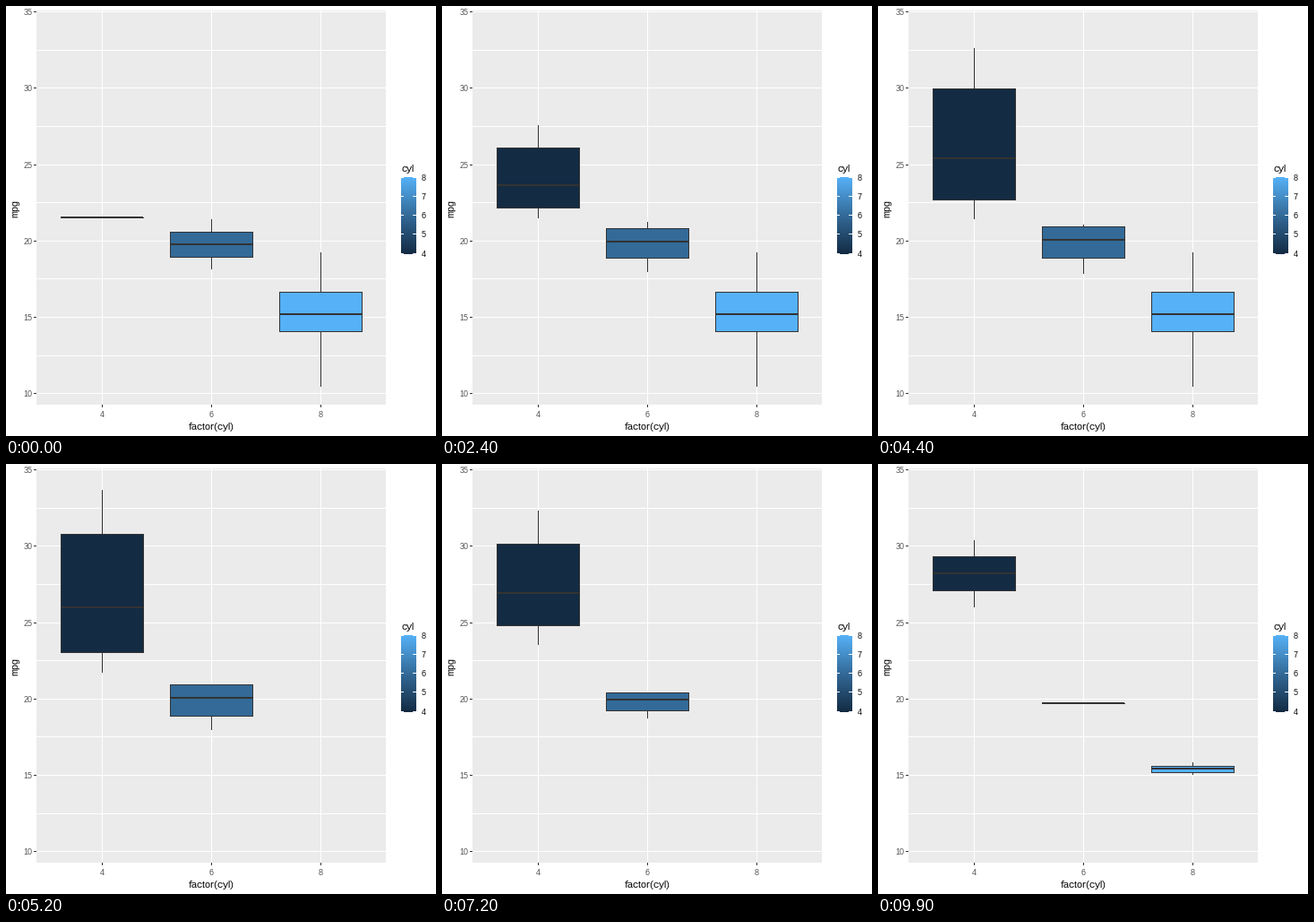
Recreate the animation shown at these times as a matplotlib script. Size 480 by 480 pixels, loop 10 s.

```python
import math

import matplotlib.pyplot as plt
import numpy as np
from matplotlib.animation import FuncAnimation
from matplotlib.colors import LinearSegmentedColormap
from matplotlib.patches import Rectangle

SIZE, DPI = 480, 72
FRAMES, INTERVAL = 100, 100
MID = 49                      # frame at which the second state is reached
INK = "#333333"

plt.rcParams.update({
    "font.family": "Liberation Sans",
    "text.hinting": "native",
    "text.hinting_factor": 1,
})

# Panel geometry in pixels
LEFT, TOP, RIGHT, BOTTOM = 34, 5, 424, 445
UNIT_X, UNIT_Y = 121.9, 17.0365
HALF = 0.375 * UNIT_X

# Five-number summaries for each cylinder count, one per state
STATS = {
    4: [(21.5,) * 5,
        (21.4, 22.8, 25.85, 30.9, 33.9),
        (26.0, 27.1, 28.2, 29.3, 30.4)],
    6: [(18.1, 18.925, 19.75, 20.575, 21.4),
        (17.8, 18.85, 20.1, 21.0, 21.0),
        (19.7,) * 5],
    8: [(10.4, 14.05, 15.2, 16.625, 19.2),
        None,
        (15.0, 15.2, 15.4, 15.6, 15.8)],
}
FILL = {4: "#132B43", 6: "#336A98", 8: "#56B1F7"}

fig = plt.figure(figsize=(SIZE / DPI, SIZE / DPI), dpi=DPI, facecolor="white")
ax = fig.add_axes([0, 0, 1, 1])


def px(cyl):
    return 34.4 + UNIT_X * (0.6 + (cyl - 4) / 2)


def py(mpg):
    return 5.48 + UNIT_Y * (35.075 - mpg)


def rect(x0, y0, x1, y1, color, z=1):
    """Filled block covering pixels x0..x1-1 and y0..y1-1."""
    return ax.add_patch(Rectangle((x0, y0), x1 - x0, y1 - y0, facecolor=color,
                                  linewidth=0, antialiased=False, zorder=z))


def label(x, y, text, size, color="black", **kw):
    kw.setdefault("va", "baseline")
    ax.text(x, y, text, fontsize=size, color=color, **kw)


def draw_panel():
    rect(LEFT, TOP, RIGHT, BOTTOM, "#EBEBEB")
    for k in range(11):
        mpg = 10 + 2.5 * k
        row = math.floor(py(mpg))
        rect(LEFT, row, RIGHT, row + 1, "white")
        if k % 2 == 0:
            rect(LEFT - 3, row, LEFT, row + 1, INK)
            label(29.5, row + 4, f"{mpg:.0f}", 9, "#4D4D4D", ha="right")
    for cyl in STATS:
        col = math.floor(px(cyl))
        rect(col, TOP, col + 1, BOTTOM, "white")
        rect(col, BOTTOM, col + 1, BOTTOM + 3, INK)
        label(px(cyl), 459, str(cyl), 9, "#4D4D4D", ha="center")
    label(229.4, 473, "factor(cyl)", 11, ha="center")
    label(15, 225.7, "mpg", 11, rotation=90, ha="right", va="center")


def draw_legend():
    x0, x1, y0, y1 = 441, 458, 191, 277
    shades = LinearSegmentedColormap.from_list("cyl", list(FILL.values()))
    bar = shades(np.linspace(1, 0, y1 - y0))[:, None, :3]
    ax.imshow(bar, extent=(x0, x1, y1, y0), aspect="auto",
              interpolation="nearest", zorder=1)
    label(x0, 185, "cyl", 11)
    for k in range(5):
        row = math.floor(y0 + (y1 - y0 - 1) * k / 4)
        rect(x0, row, x0 + 3, row + 1, "white", 2)
        rect(x1 - 4, row, x1, row + 1, "white", 2)
        label(463.6, row + 4, str(8 - k), 9)


class Box:
    """Box with one-pixel outline, two whiskers and a thick median."""

    def __init__(self, cyl):
        self.mid = math.floor(px(cyl))
        self.x0 = math.floor(px(cyl) - HALF)
        self.x1 = math.floor(px(cyl) + HALF) + 1
        colors = (INK, INK, INK, FILL[cyl], INK)
        self.upper, self.lower, self.edge, self.body, self.median = [
            rect(0, 0, 0, 0, c, 3 + i) for i, c in enumerate(colors)]
        self.parts = (self.upper, self.lower, self.edge, self.body, self.median)

    def update(self, stats):
        for part in self.parts:
            part.set_visible(stats is not None)
        if stats is None:
            return
        low, q1, med, q3, high = (math.floor(py(v)) for v in stats)
        x0, x1, mid = self.x0, self.x1, self.mid
        self.upper.set_bounds(mid, high, 1, q3 - high)
        self.lower.set_bounds(mid, q1, 1, low - q1)
        self.edge.set_bounds(x0, q3, x1 - x0, q1 - q3 + 1)
        self.body.set_bounds(x0 + 1, q3 + 1, x1 - x0 - 2, max(q1 - q3 - 1, 0))
        self.median.set_bounds(x0, med - 1, x1 - x0 - 1, 2)


def stats_at(cyl, frame):
    first, second, third = STATS[cyl]
    if frame < MID:
        a, b, t = first, second, frame / MID
    else:
        a, b, t = second, third, (frame - MID) / (FRAMES - 1 - MID)
    if t == 1:
        return b
    if a is None or b is None:
        return a
    # rounding guards against pixel jitter from float error
    return [round(p + (q - p) * t, 9) for p, q in zip(a, b)]


draw_panel()
draw_legend()
boxes = {cyl: Box(cyl) for cyl in STATS}
ax.set_xlim(0, SIZE)
ax.set_ylim(SIZE, 0)
ax.axis("off")


def update(frame):
    for cyl, box in boxes.items():
        box.update(stats_at(cyl, frame))
    return [part for box in boxes.values() for part in box.parts]


anim = FuncAnimation(fig, update, frames=FRAMES, interval=INTERVAL,
                     repeat=True, repeat_delay=0, blit=False)
plt.show()
```
